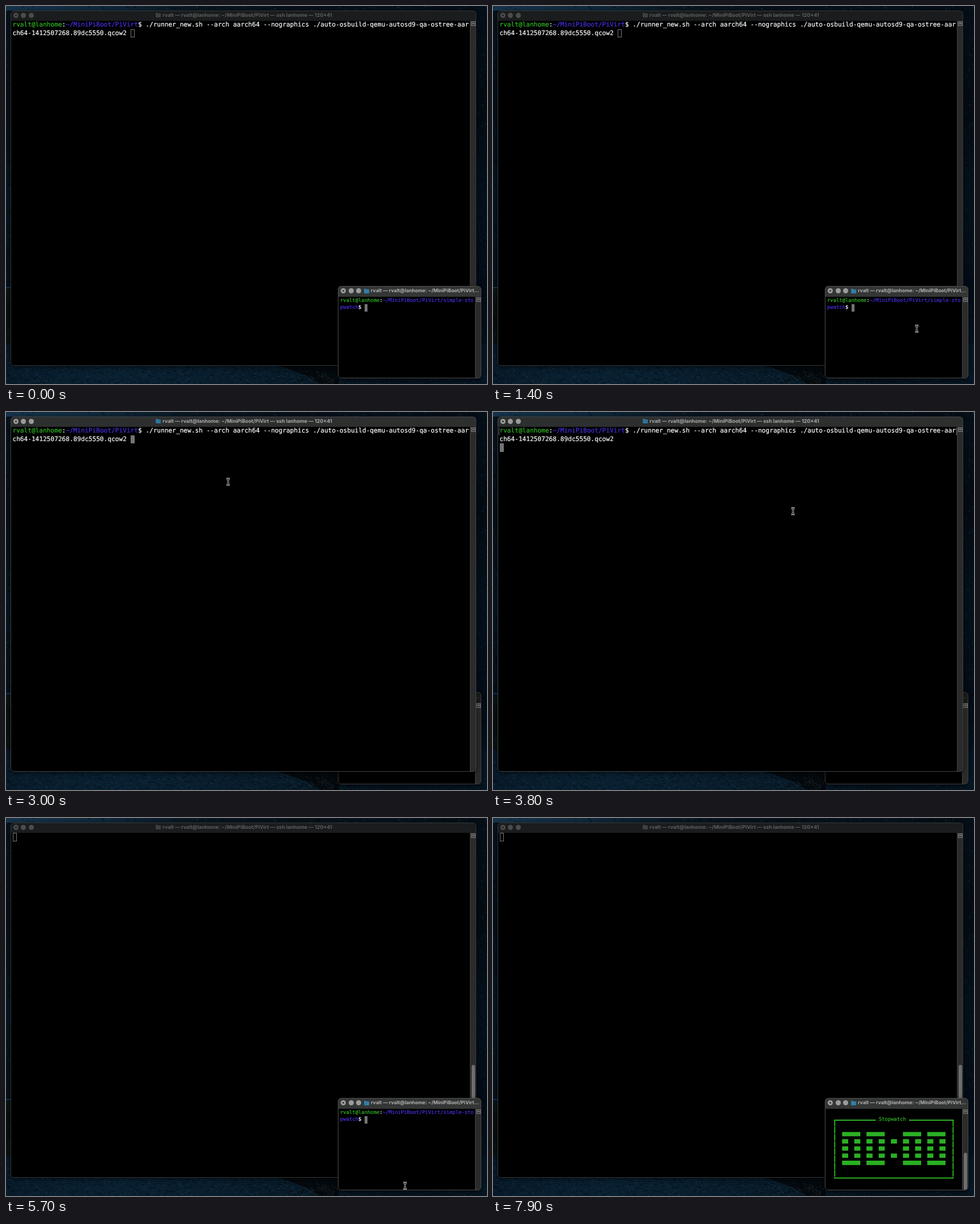
An HTML page with a canvas for the animation above (8000 ms loop, 845 by 663 pixels).

```html
<!DOCTYPE html>
<html lang="en">
<head>
<meta charset="utf-8">
<title>Terminal session</title>
<style>
html, body { margin: 0; width: 100%; height: 100%; overflow: hidden; background: #06121e; }
#stage { position: relative; width: 845px; height: 663px; overflow: hidden; text-rendering: geometricPrecision; }
#stage *, #stage *::before { box-sizing: border-box; }
#stage div, #stage i, canvas, svg { position: absolute; }

/* windows */
.win {
  background: #000; border-radius: 6px; overflow: hidden;
  box-shadow: 0 3px 9px rgba(0, 0, 0, .55);
  animation: 8s step-end infinite;
}
.win::before {
  content: ""; position: absolute; inset: 0; z-index: 5;
  border: 1px solid var(--edge); border-radius: 6px;
}
#main { left: 8px; top: 8px; width: 818px; height: 623px; z-index: 1; animation-name: mainFocus; }
#mini { left: 583px; top: 491px; width: 252px; height: 162px; animation-name: miniFocus; }
.bar { left: 0; top: 0; width: 100%; height: 18px; background: var(--bar); }
#mini .bar { height: 19px; }
.title {
  top: 0; white-space: pre; color: var(--ink);
  font: 700 8.8px/17px Inter, "Liberation Sans", sans-serif;
}
#mini .title { font-size: 8.55px; line-height: 18px; }
.dot { width: 9px; height: 9px; top: 4px; border-radius: 50%; background: var(--dot); }
.dot:first-child::before {
  content: ""; position: absolute; left: 3px; top: 3px; width: 3px; height: 3px;
  border-radius: 50%; background: var(--bar);
}
.folder { width: 9px; height: 7px; top: 5px; border-radius: 1px; background: var(--folder); }
.folder::before {
  content: ""; position: absolute; left: 0; top: -1px; width: 4px; height: 2px; background: var(--folder);
}
.track { right: 0; bottom: 0; width: 11px; background: #2a2b2a; border-left: 1px solid #424342; }
.split { left: 1px; top: 1px; width: 8px; height: 8px; border: 1px solid #767776; background: #444; }
.split::before { content: ""; position: absolute; left: 1px; top: 2px; width: 4px; height: 1px; background: #909190; }
.thumb { left: 2px; width: 6px; border-radius: 3px; background: #6d6e6d; }

/* terminal text */
.term {
  font-family: "DejaVu Sans Mono", "Liberation Mono", monospace; color: #fff; white-space: pre;
  -webkit-text-stroke: .2px currentColor;
}
#main .term { left: 3.5px; top: 18px; font-size: 11.1px; line-height: 14.5px; }
#mini .term { left: 4px; top: 19.7px; font-size: 8.87px; line-height: 12.6px; }
.layer, .line { left: 0; top: 0; }
.term b { font-weight: 400; color: #32bb25; }
.term u { text-decoration: none; color: #4730e6; }
.cursor { width: 1.05ch; background: var(--fill); border: 1px solid #777; }
#main .cursor { height: 14.5px; }
#mini .cursor { height: 12.6px; }
.mark { width: 2px; height: 12px; top: 2px; border: 1px solid #666; }

/* timed parts */
.timed { animation: 8s step-end infinite; }
.typed { left: 8ch; top: 12.6px; overflow: hidden; animation: type 8s infinite; }
.follow { animation: follow 8s infinite; }

@keyframes mainFocus {
  0%, 70% { --bar: #1a1c1d; --ink: #5e5f5f; --dot: #4b4c4c; --folder: #3d4040; --fill: transparent; --edge: #343738; }
  36.25% { --bar: #2d2f2f; --ink: #a9aaa9; --dot: #9a9b99; --folder: #2b7399; --fill: #727372; --edge: #414444; }
}
@keyframes miniFocus {
  0%, 70% { z-index: 2; --bar: #343635; --ink: #b0b1af; --dot: #9b9c9a; --folder: #2f7ea6; --fill: #727372; --edge: #4a4c4a; }
  36.25% { z-index: 0; --bar: #1a1c1b; --ink: #5e5f5f; --dot: #4b4c4c; --folder: #3d4040; --fill: transparent; --edge: #3c3e3c; }
}
@keyframes command { 0% { opacity: 1 } 53.75% { opacity: 0 } }
@keyframes marks { 0%, 53.75% { opacity: 0 } 42.5% { opacity: 1 } }
@keyframes mainCursor {
  0% { left: 31ch; top: 14.5px }
  42.5% { left: 0; top: 29px }
  53.75% { left: 0; top: 0 }
}
@keyframes mainThumb { 0% { opacity: 0 } 53.75% { opacity: 1 } }
@keyframes miniThumb { 0% { opacity: 0 } 87.5% { opacity: 1 } }
@keyframes prompt { 0% { opacity: 1 } 93.75% { opacity: 0 } }
@keyframes watch { 0% { opacity: 0 } 93.75% { opacity: 1 } }
@keyframes type {
  0% { width: 0; animation-timing-function: step-end }
  76.25% { width: 0; animation-timing-function: steps(5) }
  83.75% { width: 5ch; animation-timing-function: step-end }
  87.5%, 100% { width: 0 }
}
@keyframes follow {
  0% { left: 8ch; animation-timing-function: step-end }
  76.25% { left: 8ch; animation-timing-function: steps(5) }
  83.75% { left: 13ch; animation-timing-function: step-end }
  87.5%, 100% { left: 8ch }
}

/* pointer */
#mouse { left: 0; top: 0; z-index: 9; animation: travel 8s ease-in-out infinite; }
#mouse svg { left: -8px; top: -8px; overflow: visible; }
@keyframes travel {
  0%, 20% { transform: translate(744.5px, 566px) }
  31.25%, 36.25% { transform: translate(382.5px, 119.5px) }
  44%, 56.25% { transform: translate(527px, 174px) }
  66.25%, 100% { transform: translate(701px, 645px) }
}
@keyframes beam { 0%, 65%, 76.25% { opacity: 0 } 12.5%, 70% { opacity: 1 } }
@keyframes arrow { 0%, 70% { opacity: 0 } 65% { opacity: 1 } }
</style>
</head>
<body>
<div id="stage">
  <canvas id="sea" width="845" height="663"></canvas>

  <div class="win" id="main">
    <div class="bar">
      <i class="dot" style="left:5px"></i><i class="dot" style="left:18px"></i><i class="dot" style="left:31.5px"></i>
      <i class="folder" style="left:254.5px"></i>
      <div class="title" style="left:267px">rvalt — rvalt@lanhome: ~/MiniPiBoot/PiVirt — ssh lanhome — 120×41</div>
    </div>
    <div class="track" style="top:18px">
      <i class="split"></i>
      <i class="thumb timed" style="top:407px;bottom:1px;animation-name:mainThumb"></i>
    </div>
    <div class="term">
      <div class="layer timed" style="animation-name:command"><b>rvalt@lanhome</b>:<u>~/MiniPiBoot/PiVirt</u>$ ./runner_new.sh --arch aarch64 --nographics ./auto-osbuild-qemu-autosd9-qa-ostree-aar
ch64-1412507268.89dc5550.qcow2</div>
      <div class="layer timed" style="animation-name:marks">
        <i class="mark" style="left:-2px;border-right:0"></i><i class="mark" style="left:801px;border-left:0"></i>
      </div>
      <i class="cursor timed" style="animation-name:mainCursor"></i>
    </div>
  </div>

  <div class="win" id="mini">
    <div class="bar">
      <i class="dot" style="left:5px"></i><i class="dot" style="left:18.5px"></i><i class="dot" style="left:32px"></i>
      <i class="folder" style="left:46px;top:6px"></i>
      <div class="title" style="left:58px">rvalt — rvalt@lanhome: ~/MiniPiBoot/PiVirt…</div>
    </div>
    <div class="track" style="top:19px">
      <i class="split"></i>
      <i class="thumb timed" style="top:77px;bottom:1px;animation-name:miniThumb"></i>
    </div>
    <div class="term">
      <div class="layer timed" style="animation-name:prompt">
        <div class="line"><b>rvalt@lanhome</b>:<u>~/MiniPiBoot/PiVirt/simple-sto
pwatch</u>$</div>
        <div class="typed">clear</div>
        <i class="cursor follow" style="top:12.6px"></i>
      </div>
      <div class="layer timed" style="animation-name:watch">
        <b style="position:absolute;left:17ch;top:12.6px">Stopwatch</b>
      </div>
    </div>
    <svg class="timed" style="left:0;top:0;animation-name:watch" width="252" height="162" fill="none" stroke="#2bb023">
      <defs>
        <path id="zero" d="M0 0h32M0 12.6h10.7m10.7 0h10.7M0 25.2h10.7m10.7 0h10.7M0 37.8h10.7m10.7 0h10.7M0 50.4h32"/>
      </defs>
      <path stroke-width="2" d="M16.5 39H89.5M148 39H226M16.5 140.5H226"/>
      <path stroke-width="2" stroke-dasharray="11.6 1" d="M17.3 38V141M225.3 38V141"/>
      <g stroke-width="7.6">
        <use href="#zero" x="30.3" y="63.5"/><use href="#zero" x="73.1" y="63.5"/>
        <use href="#zero" x="137.2" y="63.5"/><use href="#zero" x="179.9" y="63.5"/>
        <path d="M116 76.1h10.7M116 101.3h10.7"/>
      </g>
    </svg>
  </div>

  <div id="mouse">
    <svg class="timed" style="animation-name:beam" width="16" height="16" fill="none">
      <defs>
        <path id="ibeam" d="M5 2.5Q8 2.5 8 4.5Q8 2.5 11 2.5M8 4V12M5 13.5Q8 13.5 8 11.5Q8 13.5 11 13.5M6.5 8H9.5"/>
      </defs>
      <use href="#ibeam" stroke="#ddd" stroke-width="2.8"/>
      <use href="#ibeam" stroke="#000"/>
    </svg>
    <svg class="timed" style="animation-name:arrow" width="16" height="16">
      <path d="M6 3V13L8.3 11L10 14.3L11.8 13.4L10.2 10.3H13.2Z" fill="#000" stroke="#e8e8e8"/>
    </svg>
  </div>
</div>

<script>
// Night coast behind the windows; only its rim is visible.
const g = document.getElementById('sea').getContext('2d');
let seed = 7;
const rnd = () => (seed = seed * 16807 % 2147483647) / 2147483647;
const between = (a, b) => a + (b - a) * rnd();

function wash(x, y, w, h, x2, y2, ...stops) {
  const fill = g.createLinearGradient(x, y, x2, y2);
  stops.forEach((c, i) => fill.addColorStop(i / (stops.length - 1), c));
  g.fillStyle = fill;
  g.fillRect(x, y, w, h);
}

function strokes(n, x, y, w, h, dx, dy, colors) {
  for (let i = 0; i < n; i++) {
    const px = between(x, x + w), py = between(y, y + h), k = between(.4, 1);
    g.strokeStyle = colors[Math.floor(rnd() * colors.length)];
    g.beginPath();
    g.moveTo(px, py);
    g.lineTo(px + dx * k, py + dy * k);
    g.stroke();
  }
}

wash(0, 0, 845, 663, 0, 663, '#06131f', '#050e17', '#061421', '#05101a', '#061420');
wash(0, 0, 845, 8, 845, 0, '#16334a', '#0f273a', '#08151f', '#071019', '#06111b', '#040c14');
wash(826, 0, 19, 663, 826, 663, '#050f18', '#040a11', '#04101a', '#030b16', '#051524');
strokes(120, 0, 0, 845, 8, 5, 2, ['#142e40', '#02060a', '#0a1a26']);
strokes(260, 0, 8, 8, 480, 3, 3, ['#0b2536', '#020609', '#0a1d28']);
strokes(400, 826, 8, 19, 650, 3, 4, ['#081d30', '#02060a', '#0a1a22']);
wash(0, 497, 9, 95, 0, 592, '#0a1415', '#060d0d', '#0a1415');
strokes(60, 0, 500, 8, 90, 3, 3, ['#131c19', '#020505']);
g.fillStyle = '#123453';
g.fillRect(0, 493, 8, 2);

wash(0, 594, 845, 69, 845, 594, '#081a29', '#092031', '#091e2e', '#081a27', '#06131e', '#061623');
strokes(1600, 0, 594, 530, 69, 5, 2, ['#113149', '#030c14', '#0e2a3d', '#05121c']);
strokes(500, 560, 631, 285, 32, 4, 2, ['#0b2436', '#030a11']);
g.fillStyle = '#04090d';
g.beginPath();
[[480, 631], [528, 648], [550, 663], [585, 663], [585, 631]].forEach(p => g.lineTo(...p));
g.fill();
strokes(110, 515, 638, 66, 25, 4, 3, ['#1a2c31', '#0c1a21', '#020405']);
</script>
</body>
</html>
```
